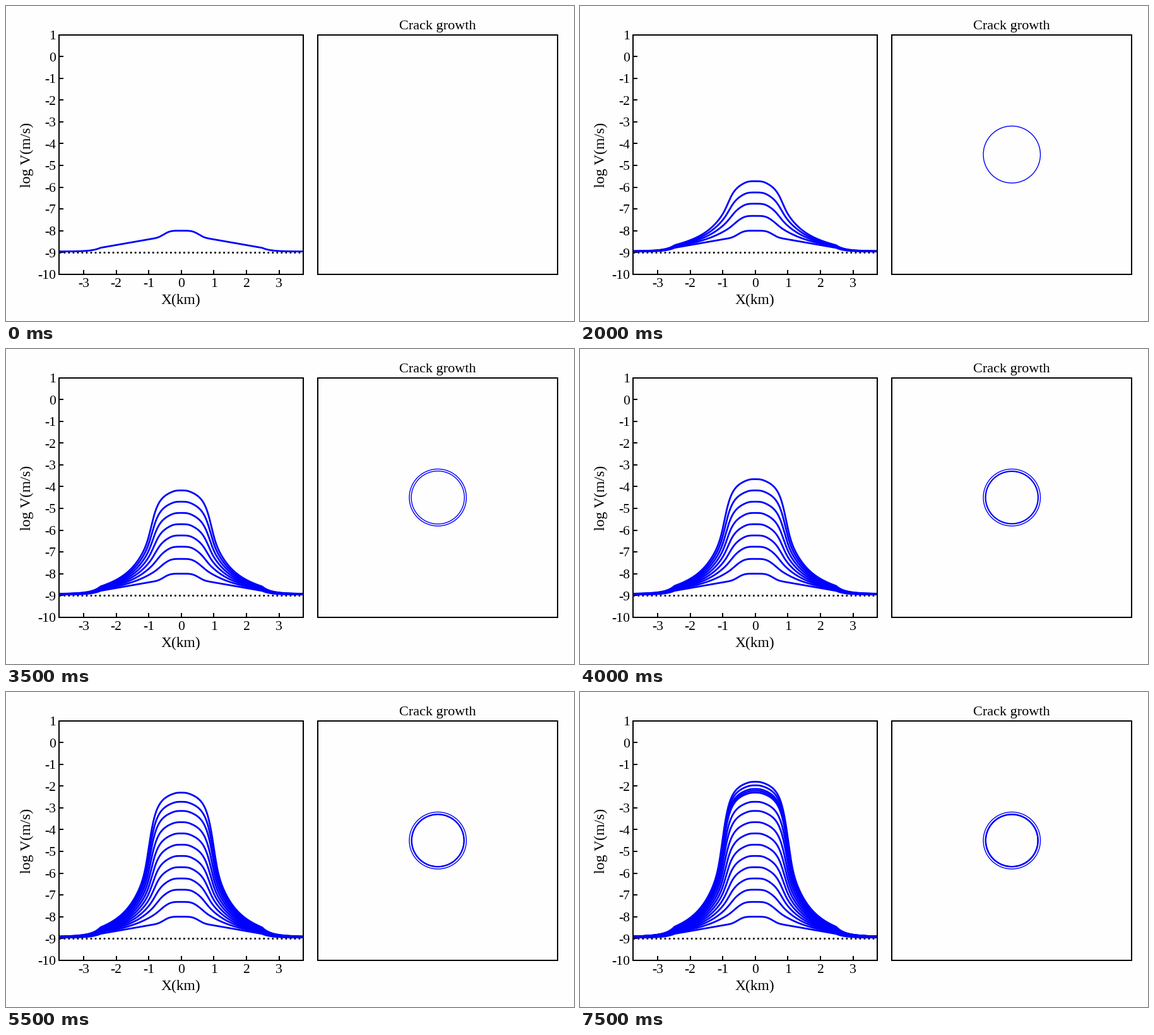
Recreate the animation shown at these times as a matplotlib script. Size 900x500 px, loop 8 s.

```python
import numpy as np
import matplotlib.pyplot as plt
from matplotlib.animation import FuncAnimation
from matplotlib.patches import Circle

W, H, DPI = 900, 500, 100
PT = 72 / DPI  # points per pixel
BLUE = "#0000ff"
LEFT, RIGHT, TOP, BOTTOM = 84.25, 471.25, 45.75, 425.75
X_MAX, V_MIN, V_MAX = 3.75, -10, 1
STEPS = 16
RING_STEPS = (4, 6, 8, 10, 14)
TICK_SIZE = 21.7


def peak_speed(step):
    """log V at the centre: quick start, steady climb, then a plateau."""
    return np.interp(step, [0, 1, 2, 9, 11, 13, 15],
                     [-8, -7.32, -6.76, -3.14, -2.30, -2.13, -1.80])


def profile(peak, x):
    """log V along the fault for a given peak value."""
    r = np.maximum(np.abs(x), 1e-3)
    edge = 1 - np.exp(-np.maximum(r - 2.48, 0) / 0.25)  # outside the weak patch
    inner = np.minimum(r, 2.48)
    start = (0.14 + 0.26 * inner) * (1 - np.exp(-(r / 0.54) ** 4)) + 0.17 * edge
    lag = 1 - (1 - 0.45 * edge) / (1 + r ** 3.2)
    far = start + lag * (peak + 8)
    cap = 0.95 * r ** 2 + 1.9 * r ** 7
    drop = far * cap / (far ** 4 + cap ** 4) ** 0.25  # smooth minimum
    return peak - drop


def ring_radius(step):
    return 41 + 4.2 * 2.0 ** (RING_STEPS[0] - step)


def panel(left, right):
    ax = fig.add_axes([left / W, 1 - BOTTOM / H, (right - left) / W, (BOTTOM - TOP) / H])
    ax.patch.set_visible(False)
    for spine in ax.spines.values():
        spine.set(linewidth=2 * PT, zorder=5)
    return ax


def text(x, y, s, size, **kw):
    fig.text(x / W, 1 - y / H, s, fontsize=size * PT, family="Liberation Serif",
             va="baseline", **kw)


def number_width(s):
    return TICK_SIZE * sum(1 / 3 if c == "-" else 0.5 for c in s)


fig = plt.figure(figsize=(W / DPI, H / DPI), dpi=DPI, facecolor="#fefefe")

speed = panel(LEFT, RIGHT)
speed.set(xlim=(-X_MAX, X_MAX), ylim=(V_MIN, V_MAX),
          xticks=range(-3, 4), yticks=range(V_MIN, V_MAX + 1))
speed.tick_params(direction="in", length=7 * PT, width=2 * PT,
                  labelbottom=False, labelleft=False)
speed.plot([-X_MAX, X_MAX], [-9, -9], color="black", lw=2.7 * PT,
           ls=(0, (1, 1.6)), dash_capstyle="butt", zorder=1)

crack = panel(494.25, 874.25)
crack.set(xlim=(-190, 190), ylim=(-190, 190), xticks=[], yticks=[])

for v in range(V_MIN, V_MAX + 1):
    y = TOP + (V_MAX - v) * (BOTTOM - TOP) / (V_MAX - V_MIN)
    text(79.2 - number_width(str(v)), y + 7.3, str(v), TICK_SIZE)
for v in range(-3, 4):
    x = (LEFT + RIGHT) / 2 + v * (RIGHT - LEFT) / (2 * X_MAX)
    text(x - number_width(str(v)) / 2, 446.5, str(v), TICK_SIZE)
text(277, 473, "X(km)", 23.5, ha="center")
text(38.5, 288, "log V(m/s)", 23.7, rotation=90, rotation_mode="anchor")
text(683.5, 37, "Crack growth", 22.3, ha="center")

xs = np.linspace(-X_MAX, X_MAX, 601)
curves = {k: speed.plot(xs, profile(peak_speed(k), xs), color=BLUE, lw=2.8 * PT)[0]
          for k in range(STEPS)}
rings = {k: crack.add_patch(Circle((0, 0), ring_radius(k), fill=False,
                                   ec=BLUE, lw=1.4 * PT))
         for k in RING_STEPS}


def update(step):
    for group in (curves, rings):
        for k, artist in group.items():
            artist.set_visible(k <= step)
    return [*curves.values(), *rings.values()]


anim = FuncAnimation(fig, update, frames=STEPS, interval=500,
                     repeat=True, repeat_delay=0, blit=False)
plt.show()
```
